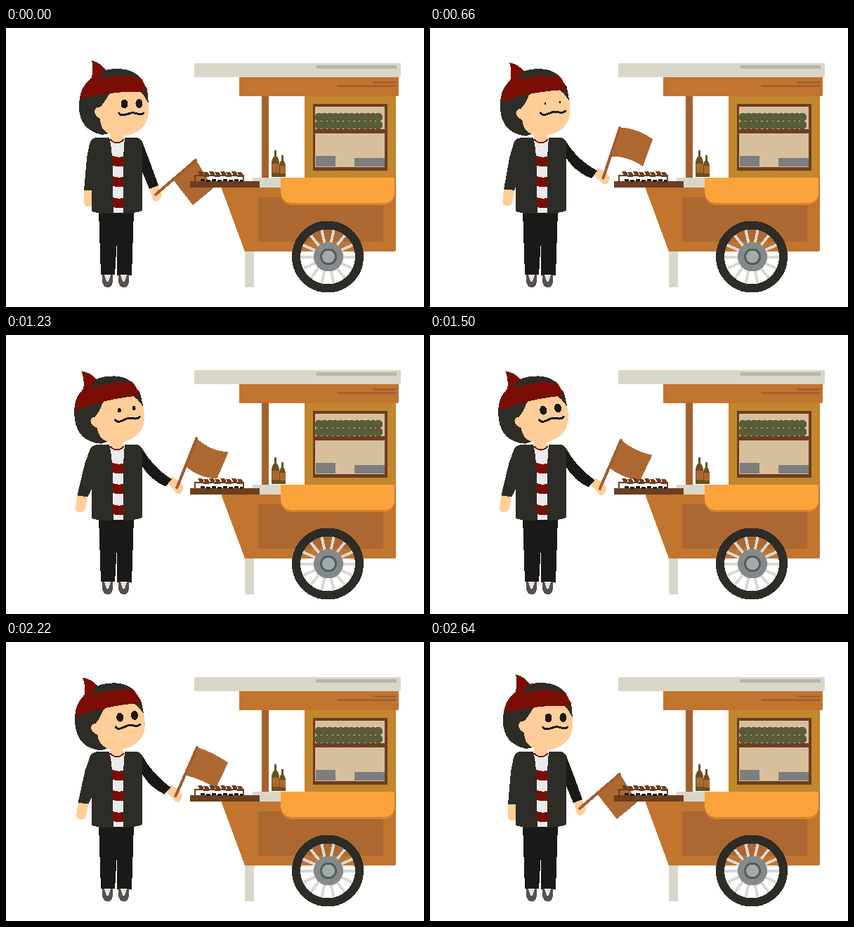
Animation, 595 px wide and 397 px high, one loop 3 s. Source, as an HTML page:

```html
<!DOCTYPE html>
<html lang="en">
<head>
<meta charset="utf-8">
<title>Street food cart</title>
<style>
html, body { margin: 0; height: 100%; overflow: hidden; background: #fff; }
svg { display: block; width: 100vw; height: 100vh; shape-rendering: crispEdges; }
.jacket { fill: #2d2c26; }
.skin { fill: #ffcd98; }
.red { fill: #7b0d04; }
.black { fill: #1a1917; }
.cream { fill: #d9d7c9; }
.wood { fill: #c1752f; }
.panel { fill: #ad6832; }
.post { fill: #a4602f; }
.dark { fill: #6c3e20; }
.line { fill: none; stroke-linecap: round; }
</style>
</head>
<body>
<svg viewBox="0 0 595 397">
  <g id="man">
    <g id="backArm">
      <path class="skin" d="M111 229H126L125 247Q124 255 117 254Q110 254 111 245Z"/>
      <path class="jacket" d="M132 156Q121 155 119 165L115 185L111 231H126L136 200Z"/>
    </g>
    <path class="black" d="M132 260H182L179 352H158V302L155 351H135Z"/>
    <g id="shoe">
      <path fill="#56514e" d="M137 351H152V361Q151 369 145 369Q138 369 137 361Z"/>
      <path fill="#e6e4e0" d="M140 351H149L146 361H143Z"/>
    </g>
    <use href="#shoe" x="23"/>
    <g id="frontArm">
      <path class="skin" d="M203 224L214 220L221 234Q224 242 216 246Q209 249 208 240Z"/>
      <path id="flag" class="panel"/>
      <path class="line" stroke="#a15c30" stroke-width="4" d="M213 237L270 188"/>
    </g>
    <path id="sleeve" class="black"/>
    <path fill="#ebebeb" d="M147 156H170V263H150Z"/>
    <path id="stripe" class="red" d="M150 181Q160 186 169 182V196Q160 199 150 195Z"/>
    <use href="#stripe" y="29"/>
    <use href="#stripe" y="59"/>
    <path class="skin" d="M148 145H167V158Q158 166 148 157Z"/>
    <path class="line" stroke="#7b0d04" stroke-width="2" d="M149 159Q158 168 167 159"/>
    <path class="jacket" d="M128 156H147Q153 180 152 230L153 264Q135 265 122 261V170Z"/>
    <path class="jacket" d="M169 156H186Q194 157 194 168V260Q182 264 167 264V200Q167 175 169 156Z"/>
    <g id="head">
      <path class="jacket" d="M137 152Q104 145 104 112Q104 84 121 72Q137 58 155 58Q179 58 191 70L201 87L203 108L170 145Z"/>
      <path class="skin" d="M146 95L155 89H189L196 96L203 107V118Q203 133 192 144Q181 153 164 154Q145 154 137 142Q134 136 134 129Q126 125 126 118Q128 112 133 113Q140 107 146 95Z"/>
      <path class="red" d="M106 101Q107 88 115 78L122 70Q125 58 122 46Q134 49 142 60L133 71Q162 65 191 70Q198 78 200 91Q150 89 106 101Z"/>
      <path class="jacket" d="M133 72Q136 62 148 59Q178 55 191 71Q163 65 133 72Z"/>
      <ellipse class="eye black" rx="5" ry="6.5" transform="translate(168.5 108)"/>
      <ellipse class="eye black" rx="5" ry="6.5" transform="translate(189.5 107.5)"/>
      <path class="line" stroke="#1a1917" stroke-width="3" d="M161 121Q163 125 169 123.5T178 121T187 122T196 121"/>
    </g>
  </g>

  <g id="cart">
    <rect class="cream" x="340" y="310" width="13" height="59" rx="1"/>
    <rect class="post" x="364" y="90" width="10" height="123"/>
    <rect fill="#c2862e" x="425" y="90" width="130" height="130"/>
    <rect class="dark" x="437" y="108" width="106" height="95"/>
    <rect fill="#d8bf9b" x="440" y="112" width="99" height="86"/>
    <g id="greens" fill="#5a5c39"></g>
    <rect class="dark" x="438" y="144" width="104" height="6"/>
    <rect fill="#7e7e7e" x="441" y="182" width="28" height="15"/>
    <rect fill="#7e7e7e" x="496" y="185" width="43" height="12"/>
    <rect class="wood" x="332" y="65" width="227" height="32" rx="2"/>
    <path class="line" stroke="#a4602f" stroke-width="3" d="M523 77H555M472 82H555"/>
    <rect class="cream" x="268" y="50" width="294" height="20" rx="2"/>
    <path class="line" stroke="#b8b6a8" stroke-width="5" d="M444 55.5H554"/>
    <g id="bottle">
      <path fill="#6b4f20" d="M382 174H385V182Q389 187 389 193V212H378V193Q378 187 382 182Z"/>
      <rect class="panel" x="379" y="193" width="10" height="13"/>
    </g>
    <use href="#bottle" transform="translate(80.5 39) scale(.816)"/>
    <path class="wood" d="M306 226H425V213H555V316Q555 318 553 318H340Z"/>
    <rect class="panel" x="359" y="241" width="178" height="63"/>
    <rect class="cream" x="351" y="213" width="45" height="14"/>
    <path fill="#d6822b" d="M391 215H553V237Q552 252 538 252H408Q392 252 391 235Z"/>
    <path fill="#fba33b" d="M391 213H553V234Q552 249 538 249H408Q392 249 391 232Z"/>
    <rect class="dark" x="262" y="218" width="99" height="9"/>
    <g id="skewers" class="dark"></g>
    <path class="line" stroke="#6c3e20" stroke-width="2" d="M269 219V210H338V219"/>
    <g id="wheel">
      <g id="spokes" stroke="#d9d8d5" stroke-width="4"></g>
      <circle class="line" cx="458" cy="325.5" r="45" stroke="#2d2c27" stroke-width="12"/>
      <circle fill="#848a8b" cx="459" cy="325.5" r="21"/>
      <circle fill="#555f60" cx="459" cy="325.5" r="12"/>
      <circle fill="#a3aaa8" cx="459" cy="325.5" r="9"/>
    </g>
  </g>
</svg>
<script>
const $ = id => document.getElementById(id);
const fill = (id, count, make) => {
  $(id).innerHTML = Array.from({ length: count }, (_, i) => make(i)).join('');
};

fill('greens', 24, i => {
  const col = i % 12, row = Math.floor(i / 12);
  return `<circle cx="${445.5 + col * 7.7}" cy="${127 + row * 11}" r="6.2"/>`;
});
fill('skewers', 8, i => {
  const x = 273 + i * 8;
  return `<path d="M${x} ${204 + i % 2}h5l3 3v4h-8l2-3z"/>
    <rect class="black" x="${x + 4}" y="${215 + i % 2}" width="6" height="3"/>`;
});
fill('spokes', 14, i => {
  const a = i / 14 * 2 * Math.PI, c = Math.cos(a), s = Math.sin(a);
  return `<path d="M${458 + c * 18} ${325.5 + s * 18}L${458 + c * 40} ${325.5 + s * 40}"/>`;
});

const LOOP = 3000;
const poleAngle = [[300, 50], [660, 19], [1005, 32], [1350, 19], [1695, 32], [2060, 19], [2640, 50]];
const lean = [[300, 0], [930, 1], [2100, 1], [2640, 0]];
const eyeSize = [[300, 1], [840, 0], [960, 0], [1500, 1]];
const billow = [[300, 0], [660, 4], [960, -6], [1500, -3], [1890, 0], [2220, 2], [2640, 0]];

const mix = (a, b, u) => a + (b - a) * u;

// Value of a keyframe track at time t, with sine easing between keys
function sample(track, t) {
  const next = track.findIndex(key => key[0] > t);
  if (next === 0) return track[0][1];
  if (next < 0) return track[track.length - 1][1];
  const [t0, v0] = track[next - 1], [t1, v1] = track[next];
  return mix(v0, v1, (1 - Math.cos(Math.PI * (t - t0) / (t1 - t0))) / 2);
}

function rotate(id, angle, x, y) {
  $(id).setAttribute('transform', `rotate(${angle} ${x} ${y})`);
}

function draw(t) {
  const raise = 50 - sample(poleAngle, t), u = raise / 31;
  const turn = sample(lean, t), size = sample(eyeSize, t), b = sample(billow, t);
  const point = (x0, y0, x1, y1) => `${mix(x0, x1, u)} ${mix(y0, y1, u)}`;

  rotate('head', -7.2 * turn, 158, 165);
  rotate('backArm', 8.5 * turn, 125, 165);
  rotate('frontArm', -raise, 187.5, 165);
  document.querySelectorAll('.eye').forEach(eye => {
    eye.setAttribute('rx', 5 * size);
    eye.setAttribute('ry', 6.5 * size);
  });
  $('sleeve').setAttribute('d', `M190 158L194 162
    Q${point(206, 193, 210, 188)} ${point(217, 224, 238, 203)}
    L${point(204, 229, 230, 214)}
    Q${point(199, 217, 207, 205)} ${point(194, 205, 194, 185)}L190 185Z`);
  // The free edge stretches out as the flag is raised
  $('flag').setAttribute('d', `M270 187
    Q${282.5 + 1.5 * b + 3 * u} ${207.5 - 1.3 * b - u} ${point(295, 228, 302, 226)}
    L${point(266, 252, 270, 252)}
    Q${252 + 1.5 * b + 2 * u} ${234 - 1.3 * b} 238 216Z`);
}

function frame() {
  draw(performance.now() % LOOP);
  requestAnimationFrame(frame);
}
frame();
</script>
</body>
</html>
```
